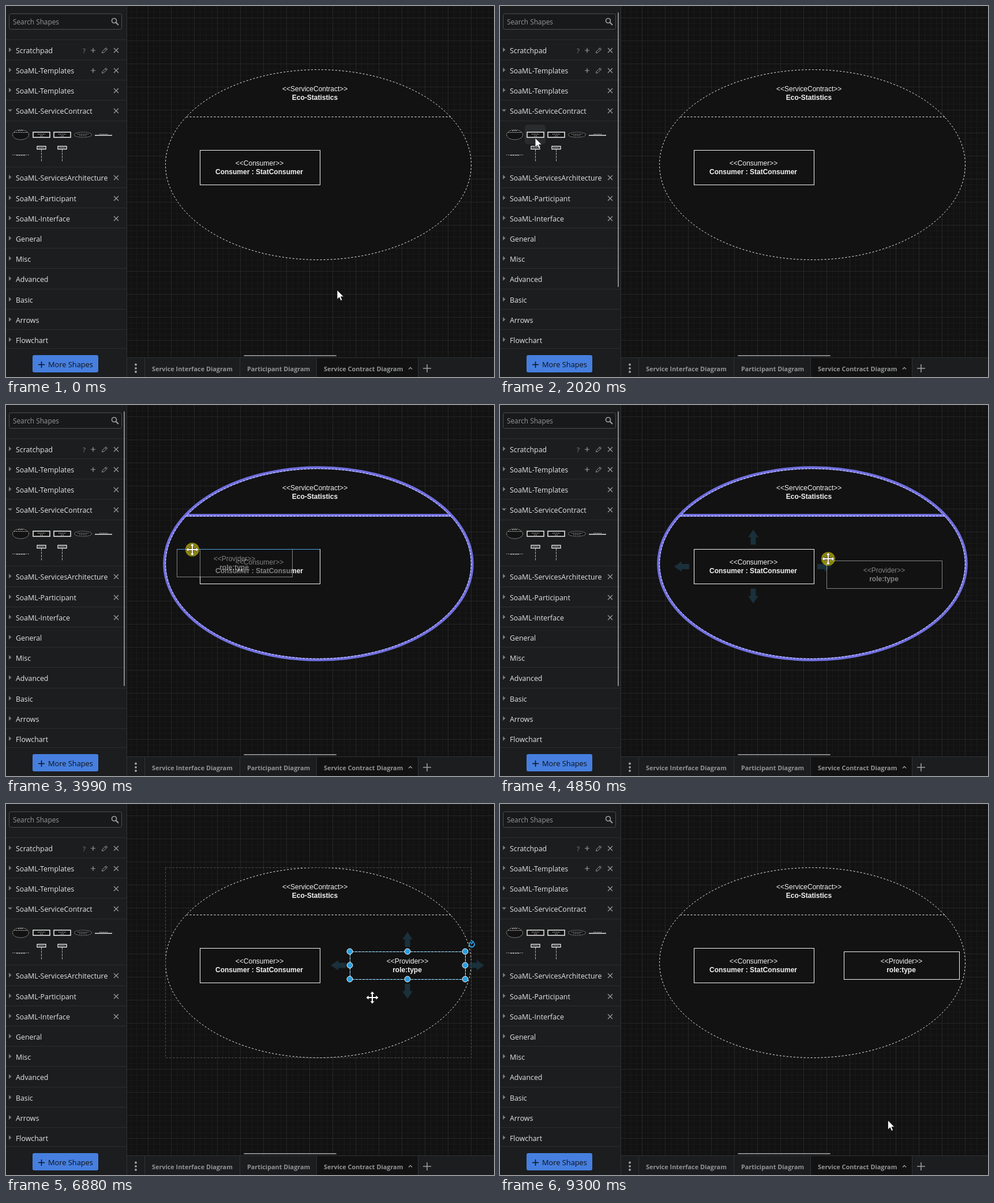
These frames come from a looping animation (846 px wide and 644 px high, 9380 ms). An HTML page:

```html
<!DOCTYPE html>
<html lang="en">
<head>
<meta charset="utf-8">
<title>Service contract editor</title>
<style>
html, body { margin: 0; width: 100%; height: 100%; overflow: hidden; background: #121212; }
svg { display: block; width: 846px; height: 644px; }
text { font-family: "Open Sans", "Noto Sans", sans-serif; white-space: pre; }
.row { font-size: 12.35px; fill: #e6e6e6; }
.tab { font-size: 10.85px; font-weight: 700; fill: #929496; }
.cell text { font: 12px "Liberation Sans", Arial, sans-serif; fill: #f2f2f2; text-anchor: middle; }
.cell .b { font-weight: 700; }
.line { fill: none; stroke: #f4f4f4; }
.dash { stroke-dasharray: 3 3; }
.icon { fill: none; stroke: #9c9d9e; stroke-width: 1.2; }
.arrow { fill: #1a303b; }
</style>
</head>
<body>
<svg id="stage" viewBox="0 0 846 644"></svg>
<script>
const LOOP = 9380, STEP = 78.17;

const rect = (x, y, w, h, attrs) => `<rect x="${x}" y="${y}" width="${w}" height="${h}" ${attrs}/>`;
const path = (d, attrs) => `<path d="${d}" ${attrs}/>`;
const text = (x, y, s, attrs = '') =>
  `<text x="${x}" y="${y}" ${attrs}>${s.replace(/</g, '&lt;').replace(/>/g, '&gt;')}</text>`;
const oval = (cx, cy, rx, ry, attrs) => `<ellipse cx="${cx}" cy="${cy}" rx="${rx}" ry="${ry}" ${attrs}/>`;
const group = (id, body, attrs = '') => `<g id="${id}" ${attrs}>${body}</g>`;

function grid() {
  let minor = '', major = '';
  for (let x = 216; x < 846; x += 10) {
    const d = `M${x + .5} 0V610`;
    x % 40 === 6 ? major += d : minor += d;
  }
  for (let y = 0; y < 610; y += 10) {
    const d = `M210 ${y + .5}H846`;
    y % 40 === 20 ? major += d : minor += d;
  }
  return path(minor, 'stroke="#191919"') + path(major, 'stroke="#262626"');
}

function thumbnails() {
  const poster = x => rect(x - 7.5, 243.5, 15, 5, 'class="line" stroke-width="1.3"') +
    path(`M${x - 5} 246H${x + 5}`, 'class="line" stroke-dasharray="2 1"') +
    path(`M${x} 249V271`, 'class="line" stroke="#aaa" stroke-dasharray="4 1.5" opacity=".7"');
  const box = x => rect(x, 219, 29, 9, 'fill="#121212" stroke="#eee" stroke-width="1.5"') +
    path(`M${x + 8} 222.5h13m-9 3h5`, 'stroke="#bbb" stroke-dasharray="2 1"');
  return oval(25.5, 223.5, 14, 8.5, 'fill="#121212" stroke="#aaa" stroke-dasharray="2 1"') +
    path('M14 219.5H37M21 216.5h9', 'stroke="#bbb" stroke-dasharray="2 1"') +
    box(47) + box(83) +
    oval(133.5, 223.5, 15, 4.5, 'fill="#121212" stroke="#999" stroke-dasharray="2 1"') +
    path('M124 222.5h19m-16 2.5h13', 'stroke="#999" stroke-dasharray="2 1"') +
    path('M154 224.5H184', 'class="line" stroke-width="1.4"') +
    path('M162 222.5h14', 'stroke="#aaa" stroke-dasharray="2 1"') +
    path('M11 258.5H40', 'stroke="#999" stroke-dasharray="2 1"') +
    path('M18 259H33', 'stroke="#ddd" stroke-dasharray="3 1"') +
    poster(61.5) + poster(97.5);
}

function sidebar() {
  const rows = [[77, 'Scratchpad'], [112, 'SoaML-Templates'], [147, 'SoaML-Templates'],
    [182, 'SoaML-ServiceContract'], [298, 'SoaML-ServicesArchitecture'], [334, 'SoaML-Participant'],
    [369, 'SoaML-Interface'], [404, 'General'], [439, 'Misc'], [474, 'Advanced'], [510, 'Basic'],
    [545, 'Arrows'], [580, 'Flowchart']];
  let s = rect(0, 0, 209, 644, 'fill="#1b1d1e"') + path('M209.5 0V644', 'stroke="#303234"');
  s += rect(5.5, 13.5, 195, 27, 'rx="3" fill="#18191a" stroke="#4c4e50"') +
    text(12, 32, 'Search Shapes', 'font-size="11.8" fill="#96989a"') +
    `<circle cx="187.5" cy="25.5" r="4" class="icon" style="stroke-width:1.7"/>` +
    path('M190.5 28.5L195 33', 'class="icon" style="stroke-width:2.2"');
  rows.forEach(([y, name], i) => {
    s += path(`M0 ${y - 18.5}H209`, 'stroke="#2b2d2f"') + text(17, y + 4.7, name, 'class="row"');
    s += path(i === 3 ? 'M3 179.5h8l-4 4z' : `M5 ${y - 5}l4.5 4l-4.5 4z`, 'fill="#77797b"');
    if (i < 7) s += path(`M187 ${y - 4}l8 8m0-8l-8 8`, 'class="icon"');
    if (i < 2) s += path(`M147 ${y}h8m-4-4v8`, 'class="icon"') +
      path(`M166.500 ${y + 4.5}l.8-3l6-6l2.300 2.300l-6 6zM171.800 ${y - 3}l2.300 2.300`, 'class="icon" style="stroke-width:1"');
  });
  s += text(133, 81.500, '?', 'font-size="11.5" fill="#85878a"');
  s += path('M0 199.500H209M0 594.500H209', 'stroke="#2b2d2f"');
  s += group('hover', rect(43, 206, 36, 34, 'rx="5" fill="#2a2b2c"')) + thumbnails();
  s += rect(46, 606, 114, 30, 'rx="3" fill="#467fdf"') +
    path('M56 622.500h11m-5.500-5.500v11', 'stroke="#101214" stroke-width="1.5"') +
    text(73, 627, 'More Shapes', 'font-size="12.8" fill="#101214"');
  return s + group('scroll', rect(204, 11, 2, 477, 'rx="1" fill="#858789"'));
}

function tabs() {
  return rect(210, 610, 636, 34, 'fill="#1b1d1e"') + rect(539, 611, 175, 33, 'fill="#121212"') +
    path('M210 610.500H846M240.500 611V644M405.500 611V644M538.500 611V644M714.500 611V644', 'stroke="#303234"') +
    [622.5, 628.8, 635].map(y => `<circle cx="225" cy="${y}" r="1.9" fill="#a2a4a6"/>`).join('') +
    text(253, 633.5, 'Service Interface Diagram', 'class="tab"') +
    text(418, 633.5, 'Participant Diagram', 'class="tab"') +
    text(551, 633.5, 'Service Contract Diagram', 'class="tab"') +
    path('M698 630.500l3-3l3 3', 'class="icon" style="stroke-width:1.4"') +
    path('M723 629h14m-7-7v14', 'class="icon" style="stroke-width:1.6"') +
    rect(412, 606, 161, 2, 'rx="1" fill="#858789"');
}

const provider = id => group(id, rect(.5, .5, 200, 48, 'fill="#121212" stroke="#f4f4f4"') +
  text(100, 21, '<<Provider>>') + text(99.5, 36, 'role:type', 'class="b"'), 'class="cell"');

// Four direction arrows around a box
function arrows(id, cx, cy, dx, dy) {
  const one = (x, y, a) => path('M0-13L9 0H4.500V13H-4.500V0H-9Z', `class="arrow" transform="translate(${x} ${y}) rotate(${a})"`);
  return group(id, one(cx, cy - dy, 0) + one(cx + dx, cy, 90) + one(cx, cy + dy, 180) + one(cx - dx, cy, 270));
}

function selection() {
  const handles = [];
  for (const x of [596, 696, 796]) for (const y of [256, 280, 304])
    if (x !== 696 || y !== 280) handles.push(`<circle cx="${x}" cy="${y}" r="5" fill="#2a9ede" stroke="#eef6fb"/>`);
  return group('select', rect(276.5, 110.5, 530, 330, 'class="dash" fill="none" stroke="#555"') +
    rect(596.5, 256.5, 200, 48, 'class="dash" fill="none" stroke="#2a9ede"') + handles.join('') +
    path('M806 239.500a4.500 4.500 0 1 0 5.500 2M806 236.500l4.500 3l-4.500 3.500', 'fill="none" stroke="#2a9ede" stroke-width="2"'));
}

const pointer = group('pointer', path('M0 0V16.200L3.800 12.700L6.300 18.500L9 17.300L6.500 11.700H11.500Z',
  'fill="#fff" stroke="#111" stroke-width=".8"'));
const cross = 'M0-10.500L3.500-6.500H1V-1H6.500V-3.500L10.500 0L6.500 3.500V1H1V6.500H3.500L0 10.500L-3.500 6.500H-1V1H-6.500V3.500L-10.500 0L-6.500-3.500V-1H-1V-6.500H-3.500Z';
const mover = group('mover', path(cross, 'fill="#fff" stroke="#111" stroke-width="1" paint-order="stroke"'));

const stage = document.getElementById('stage');
stage.innerHTML = rect(0, 0, 846, 644, 'fill="#121212"') + grid() +
  oval(541.5, 275.5, 265, 165, 'fill="#121212"') +
  group('glow', oval(541.5, 275.5, 266.7, 166.7, '') + path('M311 191.500H772', ''), 'fill="none" stroke="#716fdf" stroke-width="5"') +
  oval(541.5, 275.5, 265, 165, 'class="line dash"') + path('M312.500 192.500H771', 'class="line dash"') +
  `<g class="cell">${text(535.7, 148, '<<ServiceContract>>')}${text(535.5, 163, 'Eco-Statistics', 'class="b"')}
  ${rect(336.5, 250.5, 208, 60, 'fill="#121212" stroke="#f4f4f4"')}
  ${text(439.5, 277, '<<Consumer>>')}${text(439, 292, 'Consumer : StatConsumer', 'class="b"')}</g>` +
  arrows('aroundConsumer', 439, 280.5, 124, 51) + provider('placed') +
  arrows('aroundProvider', 696, 280, 120, 45) + selection() +
  `<g opacity=".5">${provider('ghost')}</g>` +
  path('', 'id="guide" stroke="#4aa3d8"') + tabs() + sidebar() +
  group('cursor', `<circle id="press" r="12" fill="#fff000"/>` + pointer + mover);

const el = id => document.getElementById(id);
const show = (id, on) => { el(id).style.display = on ? '' : 'none'; };
const place = (id, x, y) => el(id).setAttribute('transform', `translate(${x} ${y})`);

// Keys: time, x, y
const cursorKeys = [[0, 574, 493], [720, 574, 493], [1640, 112, 261], [2030, 61, 229], [2540, 61, 229],
  [2980, 86, 228], [3517, 86, 228], [3987, 323, 251], [4847, 569, 267], [5400, 605, 253], [6470, 605, 253],
  [6879, 635, 336], [7400, 673, 556], [8780, 673, 556], [9060, 673, 553], [9300, 672.5, 549], [9400, 672.5, 549]];
const ghostKeys = [[3517, 60, 228], [3987, 296, 250], [4847, 566, 270], [5400, 596, 256], [6600, 596, 256]];

// Smooth curve through the keys, standing still where two keys agree
function along(keys, t) {
  const last = keys.length - 1;
  const slope = (i, c) => {
    if (i <= 0 || i >= last) return 0;
    const [a, b, d] = [keys[i - 1], keys[i], keys[i + 1]];
    return a[c] === b[c] || b[c] === d[c] ? 0 : (d[c] - a[c]) / (d[0] - a[0]);
  };
  if (t <= keys[0][0]) return keys[0].slice(1);
  let i = 0;
  while (i < last - 1 && t >= keys[i + 1][0]) i++;
  const h = keys[i + 1][0] - keys[i][0], u = Math.min(1, (t - keys[i][0]) / h), v = 1 - u;
  return [1, 2].map(c => v * v * (1 + 2 * u) * keys[i][c] + u * u * (3 - 2 * u) * keys[i + 1][c] +
    h * u * v * (v * slope(i, c) - u * slope(i + 1, c)));
}

place('placed', 596, 256);

function draw(now) {
  const ms = now % LOOP;
  const t = Math.floor(ms / STEP + .17) * STEP;
  const [x, y] = along(cursorKeys, t);
  const drag = ms >= 3510 && ms < 6480, dropped = ms >= 6480;
  const inGraph = drag && x > 210;
  const inOval = ((x - 541.5) / 265) ** 2 + ((y - 275.5) / 165) ** 2 < 1;
  const moving = inGraph || dropped && inOval;

  place('cursor', x.toFixed(1), y.toFixed(1));
  show('pointer', !moving);
  show('mover', moving);
  const click = ms >= 7750 && ms < 7830;
  show('press', drag || click);
  el('press').setAttribute('opacity', moving ? .52 : .65);

  const slot = Math.floor((x - 43) / 36);
  show('hover', ms > 1630 && ms < 3590 && y < 240 && slot >= 0 && slot < 3);
  place('hover', slot * 36, 0);
  show('scroll', ms >= 1400 && !dropped);

  let [gx, gy] = along(ghostKeys, t);
  if (t < 5390) {
    gx = Math.round((gx - 6) / 10) * 10 + 6;
    gy = Math.round(gy / 10) * 10;
  }
  show('ghost', inGraph);
  place('ghost', gx, gy);
  const topAligned = gy === 250 && ms < 4200, centred = ms >= 5470;
  show('guide', inGraph && (topAligned || centred));
  el('guide').setAttribute('d', topAligned ? `M${Math.min(gx, 336)} 250.500H544` : 'M336 280.500H796');

  show('glow', inGraph && inOval);
  show('aroundConsumer', ms >= 4450 && ms < 5080);
  show('placed', dropped);
  show('select', dropped && ms < 7830);
  show('aroundProvider', dropped && inOval);
}

const start = performance.now();
function tick(now) {
  draw(Math.max(0, now - start));
  requestAnimationFrame(tick);
}
draw(0);
requestAnimationFrame(tick);
</script>
</body>
</html>
```
